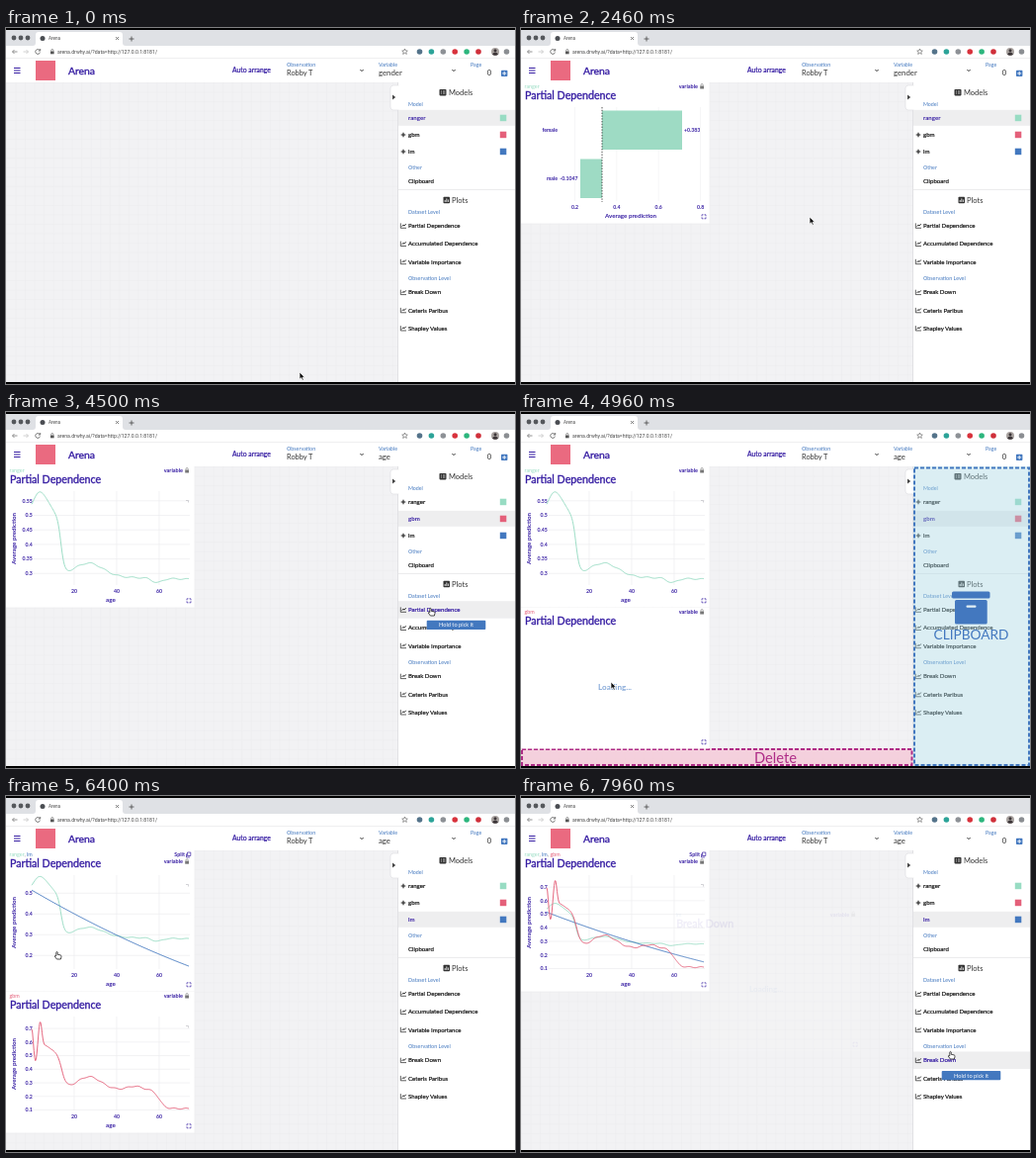
These frames come from a looping animation (515x360 px, 8 s). An HTML page:

```html
<!DOCTYPE html>
<html lang="en">
<head>
<meta charset="utf-8">
<title>Arena</title>
<style>
  html, body { margin: 0; width: 100%; height: 100%; overflow: hidden; background: #fff; }
  svg { display: block; width: 100vw; height: 100vh; font-family: Lato, 'Open Sans', sans-serif; }
  .ui { font-family: Roboto, sans-serif; }
</style>
</head>
<body>
<svg id="stage" viewBox="0 0 515 360">
  <defs>
    <pattern id="grid" x="0" y="55" width="9.53" height="9.53" patternUnits="userSpaceOnUse">
      <path d="M0 0H9.53M0 0V9.53" stroke="#e9e9ec" stroke-width=".8" fill="none"/>
    </pattern>
  </defs>
  <g id="frame"></g>
  <g id="cards"></g>
  <g id="side"></g>
  <g id="drop"></g>
  <g id="drag"></g>
  <g id="cursor"></g>
</svg>
<script>
const LOOP = 8000;
const PURPLE = '#371ea3', BLUE = '#4378bf', PLUM = '#ae2c87', INK = '#1c1c1c';
const COLORS = { ranger: '#98dcc3', gbm: '#e4607a', lm: BLUE };

// ---- drawing helpers; text is placed by its vertical centre, weight 500 is a thin outline
const text = (x, y, s, size, fill, { w = 400, a = 'start', more = '' } = {}) => {
  const weight = w === 500 ? `stroke="${fill}" stroke-width="${size * 0.035}"` : `font-weight="${w}"`;
  return `<text x="${x}" y="${y + size * 0.36}" font-size="${size}" fill="${fill}" ${weight} text-anchor="${a}" ${more}>${s}</text>`;
};
const rect = (x, y, w, h, fill, more = '') =>
  `<rect x="${x}" y="${y}" width="${w}" height="${h}" fill="${fill}" ${more}/>`;
const line = (d, color, w = 1, more = '') =>
  `<path d="${d}" fill="none" stroke="${color}" stroke-width="${w}" ${more}/>`;
const dot = (x, y, r, fill) => `<circle cx="${x}" cy="${y}" r="${r}" fill="${fill}"/>`;
const clamp = (v) => Math.max(0, Math.min(1, v));
const mix = (a, b, k) => a + (b - a) * k;
const ease = (k) => k * k * (3 - 2 * k);

// ---- browser window and page header
function drawFrame() {
  const chevron = (x) => line(`M${x - 1.6} 42l1.6 1.7 1.6-1.7`, '#333', 1);
  let s = rect(0, 0, 515, 360, '#fff') + rect(0, 0, 515, 18, '#dfe1e5') + rect(0, 0, 515, 2, '#000');
  for (let i = 0; i < 3; i++) s += dot(8 + 7 * i, 10, 2.4, '#55585c');
  s += '<path d="M27 18q3 0 3-3V7q0-3 3-3h82q3 0 3 3v8q0 3 3 3z" fill="#fff"/>';
  s += dot(37, 10.5, 2.5, '#4a4d52') + text(43, 10.5, 'Arena', 4.6, '#444', { more: 'class="ui"' });
  s += line('M111 9l3 3m0-3l-3 3', '#555', 0.7) + line('M124.5 11h5m-2.5-2.5v5', '#444', 0.8);
  s += line('M11.5 24h-5m2-2l-2 2 2 2', '#777', 0.8) + line('M17.5 24h5m-2-2l2 2-2 2', '#c4c4c4', 0.8);
  s += line('M34.2 22.6a2.4 2.4 0 1 0 .3 2M34.7 21v2h-2', '#555', 0.8);
  s += rect(45, 23.5, 3.6, 2.8, '#555') + line('M45.7 23.6v-1a1.1 1.1 0 0 1 2.2 0v1', '#555', 0.6);
  s += text(52, 24, 'arena.drwhy.ai/?data=http://127.0.0.1:8181/', 5.15, '#444', { more: 'class="ui"' });
  s += line('M403.5 21l.8 1.9 2 .2-1.5 1.3.5 2-1.8-1.1-1.8 1.1.5-2-1.5-1.3 2-.2z', '#555', 0.6);
  ['#54738a', '#2ca398', '#8d9196', '#d8323c', '#2cb67d', '#cf2f3a']
    .forEach((c, i) => { s += dot(418.5 + 11.9 * i, 24, 2.8, c); });
  s += dot(495, 24, 4, '#a9a3a0') + dot(495, 22.7, 1.5, '#3c3538') + '<path d="M492 26.6q3-4 6 0-3 2.5-6 0z" fill="#3c3538"/>';
  s += dot(506.5, 24, 2.8, '#8b8e92') + line('M0 30.5H515', '#e4e4e6', 0.6);

  s += line('M8 40.5h6.5M8 43h6.5M8 45.5h6.5', PURPLE, 1.1) + rect(30, 33, 20, 20, '#ea6a80');
  s += text(63, 43, 'Arena', 10.4, PURPLE, { w: 500 }) + text(229, 43, 'Auto arrange', 6.8, PURPLE, { w: 500 });
  s += text(284, 37, 'Observation', 5.4, BLUE) + text(284, 45.5, 'Robby T', 7.4, '#333') + chevron(360);
  s += text(377, 37, 'Variable', 5.4, BLUE) + chevron(453);
  s += text(470, 37, 'Page', 5.3, BLUE) + text(489, 45.5, '0', 7.6, '#333', { a: 'middle' });
  s += rect(501, 42.7, 6.4, 6.4, BLUE, 'rx=".8"') + line('M502.2 45.9h4m-2-2v4', '#fff', 0.9);
  s += rect(0, 55, 515, 305, '#f2f2f4') + rect(0, 55, 397, 303, 'url(#grid)');
  return s + rect(0, 358, 515, 2, '#000');
}

// ---- model curves over the plot's x range
const LEFT = 26, RIGHT = 186;
const bump = (x, c, w) => Math.exp(-(((x - c) / w) ** 2));
const fall = (x, c, w) => 1 / (1 + Math.exp((x - c) / w));
const CURVES = {
  ranger: (x) => 0.293 - 0.0001 * (x - 60) + 0.21 * fall(x, 55.5, 1.8) + 0.075 * bump(x, 35, 10)
    + 0.045 * bump(x, 84, 20) - 0.015 * bump(x, 153, 7) + 0.002 * Math.sin(x / 2.2),
  gbm: (x) => 0.11 + 0.2 * fall(x, 57, 2) + 0.14 * fall(x, 155, 3) + 0.12 * bump(x, 40, 14)
    + 0.2 * bump(x, 26, 2) - 0.07 * bump(x, 30, 2) + 0.2 * bump(x, 34.5, 2.5)
    + 0.095 * bump(x, 84, 17) + 0.025 * bump(x, 130, 10) + 0.004 * Math.sin(x / 1.9),
  lm: (x) => {
    const k = (x - LEFT) / (RIGHT - LEFT);
    return 0.515 - 0.445 * k + 0.077 * k * k;
  },
};

function curve(model, yOf) {
  let d = 'M';
  for (let x = LEFT; x <= RIGHT - 1; x += 0.75) d += `${x} ${yOf(CURVES[model](x)).toFixed(2)} `;
  return line(d, COLORS[model], 0.95, 'stroke-linejoin="round"');
}

function agePlot(models) {
  const [low, y0, scale, step, count] =
    models.includes('gbm') ? [0.1, 119.5, 137.3, 0.1, 7] :
    models.includes('lm') ? [0.2, 106.3, 210, 0.1, 4] : [0.3, 108.3, 294, 0.05, 6];
  const yOf = (v) => y0 - (v - low) * scale;
  let s = '';
  for (let i = 0; i < count; i++) {
    const v = low + i * step;
    s += line(`M28 ${yOf(v)}H${RIGHT}`, '#ececef', 0.7);
    s += text(26.7, yOf(v), +v.toFixed(2), 5.2, PURPLE, { w: 700, a: 'end' });
  }
  for (let age = 20; age <= 60; age += 20) {
    const x = LEFT + age * 2.15;
    s += line(`M${x} 25V120`, '#ececef', 0.7) + text(x, 126.2, age, 5.2, PURPLE, { w: 700, a: 'middle' });
  }
  models.forEach((m) => { s += curve(m, yOf); });
  s += text(106, 134.5, 'age', 6.3, PURPLE, { w: 700, a: 'middle' });
  s += text(0, 0, 'Average prediction', 6.2, PURPLE, { w: 700, a: 'middle', more: 'transform="translate(8 73) rotate(-90)"' });
  return s + line('M182 34.5h2.5v2', '#b5b5bd', 0.6);
}

function genderPlot() {
  const xOf = (v) => 54.5 + (v - 0.2) * 211.7;
  const bold = (x, y, s, a) => text(x, y, s, 5.2, PURPLE, { w: 700, a });
  let s = '';
  for (let i = 1; i <= 4; i++) {
    const v = i / 5;
    s += line(`M${xOf(v)} 25V120`, '#f0f0f2', 0.6) + bold(xOf(v), 126, v, 'middle');
  }
  s += rect(82, 28.5, 81, 39.5, '#9edbc4') + rect(60, 77.5, 22, 39.5, '#9edbc4');
  s += line('M82 25V121', '#222', 0.8, 'stroke-dasharray="1.4 1.4"');
  s += bold(37, 48, 'female', 'end') + bold(37, 97, 'male', 'end');
  s += bold(165, 48, '+0.383') + bold(57.5, 97, '-0.1047', 'end');
  return s + text(111, 134.7, 'Average prediction', 6.2, PURPLE, { w: 700, a: 'middle' });
}

const CARD_W = 190.5, CARD_H = 142.5;
function card({ x, y, models, plot, title = 'Partial Dependence', opacity = 1 }) {
  const many = models.length > 1, vy = many ? 11.5 : 4.3;
  const names = models.map((m) => `<tspan fill="${COLORS[m]}">${m}</tspan>`).join(', ');
  const corner = { w: 700, a: 'end' };
  let s = rect(0, 0, CARD_W, CARD_H, '#fff');
  s += text(3.5, 4.3, names, 5.4, '#777');
  s += text(4, 13.6, title, 10.7, PURPLE, { w: 500 });
  s += text(179, vy, 'variable', 5.5, PURPLE, corner);
  s += rect(181.2, vy - 0.8, 3.8, 3, '#777') + line(`M182 ${vy - 0.8}v-.9a1.1 1.1 0 0 1 2.2 0v.9`, '#777', 0.6);
  if (many) {
    s += text(181, 4.3, 'Split', 5.4, PURPLE, corner);
    s += line('M182.5 3.5v3.500h3.5M183.5 2h3.3v3.5h-3.3z', PURPLE, 0.7);
  }
  s += line('M183 135.300v-1.5h1.5m1 0h1.5v1.5m0 1v1.5h-1.5m-1 0h-1.5v-1.5', PURPLE, 0.7);
  if (plot === 'age') s += agePlot(models);
  else if (plot === 'gender') s += genderPlot();
  else s += text(95, 80, 'Loading...', 8.1, '#86a9d8', { w: 700, a: 'middle' });
  return `<g transform="translate(${x} ${y})" opacity="${opacity}">${s}</g>`;
}

// ---- side panel
const rows = (names, top, gap) => names.map((name, i) => [name, top + gap * i]);
const MODEL_ROWS = rows(['ranger', 'gbm', 'lm'], 91, 17);
const PLOT_ROWS = [
  ...rows(['Partial Dependence', 'Accumulated Dependence', 'Variable Importance'], 200, 18.2),
  ...rows(['Break Down', 'Ceteris Paribus', 'Shapley Values'], 267.3, 18.2),
];

function sidePanel(selected, hover) {
  let s = line('M396.5 55V358', '#dcdce0', 0.8) + rect(397, 55, 118, 303, '#fff');
  s += '<path d="M397 58h-5q-3 0-3 3v19q0 3 3 3h5z" fill="#fff" stroke="#dcdce0" stroke-width=".6"/>' + rect(396, 58.5, 2, 24, '#fff');
  s += '<path d="M391 67.5l3.2 2.5-3.2 2.5z" fill="#444"/>';
  s += rect(438.5, 62, 7, 6.4, '#333', 'rx=".8"') + line('M440 64h1m1 0h2.3M440 66h1m1 0h2.3', '#fff', 0.7);
  s += text(448, 65, 'Models', 7.5, '#333') + text(407, 77, 'Model', 5.3, BLUE);
  MODEL_ROWS.forEach(([name, y]) => {
    const on = name === selected;
    if (on) s += rect(397, y - 8.2, 118, 16, '#eeeeef');
    else s += line(`M399.7 ${y}h4.6m-2.3-2.3v4.6`, INK, 1.1);
    s += text(407, y - 0.3, name, 6.1, on ? PURPLE : INK, { w: on ? 700 : 500 });
    s += rect(499.8, y - 3.3, 6.5, 6.5, COLORS[name]);
  });
  s += text(407, 141.3, 'Other', 5.3, BLUE) + text(407, 154.5, 'Clipboard', 6.1, INK, { w: 500 });
  s += line('M397 163.5H515', '#e4e4e6', 0.7);
  s += rect(442.5, 170.8, 6.5, 6.4, '#333', 'rx=".8"') + line('M444.2 176v-2m1.6 2v-3.6m1.6 3.6v-2.5', '#fff', 0.8);
  s += text(451, 174, 'Plots', 7.5, '#333');
  s += text(407, 186, 'Dataset Level', 5.4, BLUE) + text(407, 253, 'Observation Level', 5.4, BLUE);
  PLOT_ROWS.forEach(([name, y]) => {
    const on = name === hover;
    if (on) s += rect(397, y - 8.8, 118, 17.5, '#eeeeef');
    s += line(`M399.3 ${y - 2.6}v4.9h5.7`, INK, 0.7) + line(`M400.7 ${y + 0.7}l1.2-1.6 1.2 1 1.6-2`, INK, 0.9);
    s += text(407, y, name, 6.1, on ? PURPLE : INK, { w: 500 });
  });
  if (hover) {
    const y = PLOT_ROWS.find(([name]) => name === hover)[1] + 10.7;
    s += rect(425.7, y, 59.6, 9.2, BLUE, 'rx="1"') + text(455.5, y + 4.5, 'Hold to pick it', 5.7, '#fff', { a: 'middle' });
  }
  return s;
}

function dropZones() {
  const dash = 'stroke-dasharray="4 2"';
  let s = rect(397, 55, 118, 303, '#a5d4e1', 'opacity=".4"') + line('M398 56.5H514V357H398Z', BLUE, 2, dash);
  s += rect(436, 181.5, 38.5, 7, BLUE, 'rx="1.5"') + rect(439, 190, 32.7, 24.5, BLUE, 'rx="1.5"') + rect(450.5, 195.5, 10, 2.2, '#e4f0f5', 'rx="1"');
  s += text(455.5, 225.5, 'CLIPBOARD', 13.7, BLUE, { a: 'middle' });
  s += rect(0, 340, 396, 18, '#f6c8d8', 'opacity=".8"') + line('M1 341H395.5V357H1Z', PLUM, 2, dash);
  return s + text(257.5, 349.3, 'Delete', 14.7, PLUM, { a: 'middle' });
}

// ---- pointer: each move runs from one time to another and ends on a spot
const SPOT = {
  start: [297, 348], midway: [139, 166], slot1: [98, 131], slot2: [91, 273], rest: [292, 191],
  select: [390, 46], gbm: [416, 106], lm: [412, 124], partial: [430, 199], breakDown: [435, 259],
  plot: [52, 158], header2: [60, 212], header1: [60, 69],
};
const MOVES = [
  [230, 470, 'partial'], [600, 800, 'midway'], [800, 1000, 'slot1'], [1330, 1530, 'rest'], [2760, 3000, 'select'],
  [4030, 4190, 'gbm'], [4250, 4400, 'partial'], [4570, 4860, 'slot2'], [5360, 5550, 'lm'], [5620, 5760, 'partial'],
  [6000, 6260, 'plot'], [6530, 6660, 'header2'], [6740, 7080, 'header1'], [7230, 7640, 'breakDown'],
];
function pointer(t) {
  let at = SPOT.start;
  for (const [from, to, spot] of MOVES) {
    const k = ease(clamp((t - from) / (to - from)));
    at = at.map((v, i) => mix(v, SPOT[spot][i], k));
  }
  return at;
}

// New cards fade in while catching up with the pointer.
const DRAGS = [
  { from: 560, to: 1100, models: ['ranger'] },
  { from: 4540, to: 5000, models: ['gbm'] },
  { from: 5980, to: 6400, models: ['lm'] },
  { from: 6700, to: 7200, models: ['gbm'], plot: 'age', grab: [60, 14] },
  { from: 7930, to: LOOP, models: ['lm'], title: 'Break Down' },
];
function dragged(d, t, [px, py]) {
  if (d.grab) return card({ ...d, x: px - d.grab[0], y: py - d.grab[1] });
  const k = clamp((t - d.from - 30) / 170);
  return card({ ...d, x: px - mix(283, 91, k), y: py - mix(144, 75, k), opacity: clamp((t - d.from) / 200) ** 1.4 });
}

function placedCards(t) {
  const list = [];
  if (t >= 1100) {
    const models = ['ranger'];
    if (t >= 6400) models.push('lm');
    if (t >= 7200) models.push('gbm');
    list.push({ x: 0, y: 55, models, plot: t < 2460 ? '' : t < 3330 ? 'gender' : t < 3500 ? '' : 'age' });
  }
  if (t >= 5000 && t < 6700) list.push({ x: 0, y: 198, models: ['gbm'], plot: t < 5030 ? '' : 'age' });
  return list;
}

const ARROW = '<path d="M0 0v7.2l1.7-1.5 1.2 2.6 1.3-.6-1.2-2.5h2.3z" fill="#111" stroke="#fff" stroke-width=".7"/>';
const HAND = '<path d="M-1.2 .6V-.1q.7-1 1.4 0V2.3l3 .6q1 .3.8 1.5l-.6 2.600h-4l-2.2-3q.2-1 1.600-.2z" fill="#fff" stroke="#222" stroke-width=".8"/>';

const drawn = {};
function put(id, html) {
  if (drawn[id] === html) return;
  drawn[id] = html;
  document.getElementById(id).innerHTML = html;
}

const FRAME = drawFrame();
function render(t) {
  const at = pointer(t), [px, py] = at;
  const drag = DRAGS.find((d) => t >= d.from && t < d.to);
  const zones = drag && t >= drag.from + 40;
  const placed = placedCards(t);
  const row = px > 397 && !zones && PLOT_ROWS.find(([, y]) => Math.abs(py - y) < 8.8);
  const onCard = !drag && placed.some((c) => px < CARD_W && py > c.y && py < c.y + CARD_H);
  const selected = t < 4220 ? 'ranger' : t < 5590 ? 'gbm' : 'lm';
  put('frame', FRAME + text(377, 45.5, t < 3330 ? 'gender' : 'age', 7.8, '#333'));
  put('cards', placed.map(card).join(''));
  put('side', sidePanel(selected, row ? row[0] : ''));
  put('drop', zones ? dropZones() : '');
  put('drag', drag ? dragged(drag, t, at) : '');
  put('cursor', `<g transform="translate(${at})">${row || onCard ? HAND : ARROW}</g>`);
}

const start = performance.now();
function tick() {
  render((performance.now() - start) % LOOP);
  requestAnimationFrame(tick);
}
tick();
</script>
</body>
</html>
```
